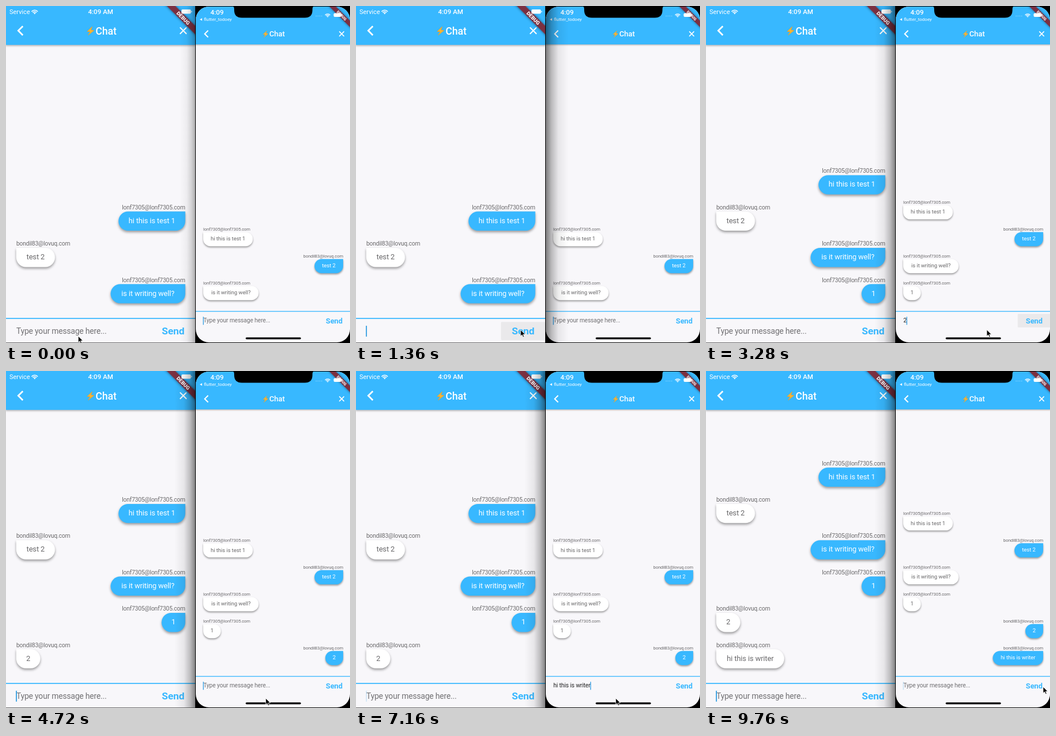
An HTML page that plays this animation: 600x588 px, repeating every 9.8 s.

```html
<!DOCTYPE html>
<html lang="en">
<head>
<meta charset="utf-8">
<title>Chat</title>
<style>
html, body { margin: 0; width: 100%; height: 100%; overflow: hidden; background: #000; }
svg { display: block; font-family: Roboto, "Open Sans", sans-serif; }
text { white-space: pre; }
.label { font-size: 11.8px; letter-spacing: -.23px; fill: #6c6b6d; }
.msg { font-size: 14.65px; letter-spacing: -.11px; text-anchor: middle; }
.field { font-size: 15.8px; letter-spacing: -.17px; }
.send { font-size: 19.8px; font-weight: 700; fill: #38b8ff; text-anchor: middle; }
.title { font-size: 20px; font-weight: 500; fill: #fff; }
.debug { font-size: 10.2px; font-weight: 900; fill: #fff; text-anchor: middle; }
.bubble { filter: drop-shadow(0 3px 2.5px rgba(0,0,0,.38)); }
.bar { filter: drop-shadow(0 2px 2px rgba(0,0,0,.28)); }
.status { fill: #fff; }
</style>
</head>
<body>
<svg id="stage" width="600" height="588" viewBox="0 0 600 588"></svg>
<script>
const LOOP = 9800;
const BLUE = '#38b8ff', PAPER = '#f8f7fa';
const ANN = 'lonf7305@lonf7305.com', BOB = 'bondil83@lovuq.com';

// sender, text, bubble width
const chat = [
  [ANN, 'hi this is test 1', 132.4],
  [BOB, 'test 2', 76.7],
  [ANN, 'is it writing well?', 148],
  [ANN, '1', 47],
  [BOB, '2', 47.7],
  [BOB, 'hi this is writer', 134.6]
];

const TYPE_AT = 4950, TYPE_STEP = 125, LAST = chat[5][1];

const phones = [
  { id: 'a', me: ANN, x: .3, y: 0, k: .88, w: 375, h: 668, top: 20, line: 619.5,
    arrive: [1460, 3600, 9300], press: [[1220, 1480]],
    typed: t => t >= 680 && t < 1340 ? '1' : '', cleared: [1340],
    caret: t => t < 400 ? 0 : t < 1600 ? 1 : blink(t - 1600) },
  { id: 'b', me: BOB, x: 331, y: 1, k: .6525, w: 414, h: 900, top: 44, line: 815,
    arrive: [1600, 3450, 8000], press: [[3050, 3420], [7780, 8160]],
    typed: t => {
      if (t >= 2600 && t < 3350) return '2';
      if (t < TYPE_AT || t >= 7900) return '';
      return LAST.slice(0, 1 + Math.floor((t - TYPE_AT) / TYPE_STEP));
    },
    cleared: [3350, 7900],
    caret: t => t < 2250 ? blink(t) : t < 3350 ? 1 : t < TYPE_AT ? blink(t - 3350)
      : t < 7850 ? 1 : blink(t - 7850) }
];

// time, x, y of the pointer tip
const path = [
  [0, 126, 576], [780, 126, 576], [1150, 287, 565], [1650, 287, 565],
  [2150, 453, 572], [2650, 453, 572], [2980, 575, 551], [3150, 575, 551],
  [3356, 453, 571], [7300, 453, 571], [7700, 588, 551], [LOOP, 588, 551]
];

const clamp = v => Math.max(0, Math.min(1, v));
const ease = v => v * v * (3 - 2 * v);

function blink(t) {
  const p = t % 1000 / 1000;
  if (p < .4) return 1;
  return p < .88 ? clamp((.6 - p) / .2) : (p - .88) / .12;
}

function bubble(x, y, w, mine) {
  const r = 19, b = y + 38, e = x + w;
  const a = (px, py) => `A${r} ${r} 0 0 1 ${px} ${py}`;
  const head = mine
    ? `M${x} ${y + r}${a(x + r, y)}H${e}`
    : `M${x} ${y}H${e - r}${a(e, y + r)}`;
  return `${head}V${b - r}${a(e - r, b)}H${x + r}${a(x, b - r)}Z`;
}

function row(p, [who, text, w], i) {
  const mine = who === p.me, x = mine ? p.w - 20 - w : 20, y = i * 72;
  return `<g id="${p.id}row${i}">
    <text class="label" x="${mine ? p.w - 20 : 20}" y="${y - 72.3}" text-anchor="${mine ? 'end' : 'start'}">${who}</text>
    <path class="bubble" d="${bubble(x, y - 68, w, mine)}" fill="${mine ? BLUE : '#fff'}"/>
    <text class="msg" x="${x + w / 2}" y="${y - 45}" fill="${mine ? '#fff' : '#69686a'}">${text}</text></g>`;
}

function phone(p) {
  const { id, w, top, line } = p, c = w / 2, m = top + 29;
  return `<g transform="translate(${p.x} ${p.y}) scale(${p.k})">
    <rect x="-1" width="${w + 1}" height="${p.h}" fill="${PAPER}"/>
    <g id="${id}list">${chat.map((msg, i) => row(p, msg, i)).join('')}</g>
    <rect class="bar" x="-1" width="${w + 1}" height="${top + 57.1}" fill="${BLUE}"/>
    <path d="M33 ${m - 9}l-9 9 9 9" fill="none" stroke="#fff" stroke-width="3.2"/>
    <path d="M${w - 30.5} ${m - 6.5}l13 13m0-13l-13 13" stroke="#fff" stroke-width="2.3"/>
    <path d="M${c - 17} ${m - 8}l-10 9.5 6 .5 -4 7 11.5-9.5 -6-1z" fill="#fdb62f" stroke="#e89a2c" stroke-width=".8"/>
    <text class="title" x="${c - 10.4}" y="${top + 36.4}">Chat</text>
    <g transform="translate(${w} 0) rotate(45)">
      <rect x="-60" y="28" width="120" height="12" fill="#7b3041" style="filter:drop-shadow(0 0 3px rgba(0,0,0,.5))"/>
      <text class="debug" x="0" y="37.6">DEBUG</text></g>
    <g transform="translate(0 ${line})">
      <rect x="-1" y="-1" width="${w + 1}" height="2" fill="${BLUE}"/>
      <rect id="${id}press" x="${w - 88}" y="7" width="88" height="36" rx="2" fill="#eae9eb"/>
      <text class="send" x="${w - 44}" y="31.8">Send</text>
      <text id="${id}hint" class="field" x="20.2" y="30" fill="#717073">Type your message here...</text>
      <text id="${id}text" class="field" x="20.2" y="30" fill="#222"></text>
      <rect id="${id}caret" y="14.5" width="2" height="21.5" fill="#2f9be0"/></g></g>`;
}

function wifi(x, y, s) {
  const arc = r => `<path d="M${-r * .75} ${-r * .66}A${r} ${r} 0 0 1 ${r * .75} ${-r * .66}" fill="none" stroke="#fff" stroke-width="1.7"/>`;
  return `<g transform="translate(${x} ${y}) scale(${s})">${arc(8)}${arc(5)}<path d="M0 0l-2-2.2a2.8 2.8 0 0 1 4 0z" fill="#fff"/></g>`;
}

function battery(x, y, w, h) {
  return `<rect x="${x}" y="${y}" width="${w}" height="${h}" rx="2"/><rect x="${x + w + .7}" y="${y + h / 2 - 1.3}" width="1.2" height="2.6" rx=".6"/>`;
}

function fade(id, from, to, dark) {
  const stop = (o, a) => `<stop offset="${o}" stop-opacity="${a}"/>`;
  return `<linearGradient id="${id}" x1="${from}" x2="${to}">${stop(0, dark)}${stop(.25, dark * .5)}${stop(.55, dark * .14)}${stop(1, 0)}</linearGradient>`;
}

const stage = document.getElementById('stage');
stage.innerHTML = `
  <defs>
    <clipPath id="left"><rect width="330" height="587.5"/></clipPath>
    <clipPath id="right"><rect x="331" y="1" width="269" height="586" rx="23"/></clipPath>
    ${fade('soft', 1, 0, .3)}${fade('back', 1, 0, .47)}${fade('front', 0, 1, .5)}
  </defs>
  <rect width="600" height="588"/>
  <g clip-path="url(#left)">${phone(phones[0])}
    <g class="status">
      <text x="6" y="14" font-size="11">Service</text>
      ${wifi(50, 14.5, .9)}
      <text x="165" y="14" font-size="11.6" font-weight="500" text-anchor="middle">4:09 AM</text>
      ${battery(306, 6, 16.5, 7.5)}
    </g>
    <rect id="soft-shade" x="303" width="27" height="588" fill="url(#soft)"/>
    <rect id="back-shade" x="294" width="36" height="588" fill="url(#back)"/>
  </g>
  <g clip-path="url(#right)">${phone(phones[1])}
    <g class="status">
      <text x="356.5" y="15.2" font-size="11.8" font-weight="500">4:09</text>
      <path d="M338 23.5l4-2.3v4.6z"/>
      <text x="345" y="26" font-size="8">flutter_todoey</text>
      <g opacity=".45">${[541, 544.2, 547.4, 550.6].map(x => `<circle cx="${x}" cy="17.5" r=".8"/>`).join('')}</g>
      ${wifi(561, 19.8, .75)}
      ${battery(571.5, 12.5, 13, 6.5)}
    </g>
    <rect x="418" y="578.2" width="96.5" height="3.3" rx="1.65"/>
    <rect id="front-shade" x="331" width="40" height="588" fill="url(#front)"/>
  </g>
  <path d="M393 0q5 0 5 5v2q0 13.5 13.5 13.5h109.5q13.5 0 13.5-13.5v-2q0-5 5-5z"/>
  <path id="mouse" d="M0 0v11.2l2.6-2.4 1.9 4 1.8-.8-1.8-3.9h3.6z" stroke="#fff" stroke-width=".8"/>`;

const el = id => document.getElementById(id);
const show = (id, on) => el(id).setAttribute('opacity', +on);

function drawPhone(p, t) {
  const { id } = p;
  const count = 3 + p.arrive.filter(a => t >= a).length;
  el(id + 'list').setAttribute('transform', `translate(0 ${p.line - (count - 1) * 72})`);
  chat.forEach((_, i) => show(id + 'row' + i, i < count));

  const text = p.typed(t), node = el(id + 'text');
  if (node.textContent !== text) node.textContent = text;
  const last = p.cleared.filter(c => t >= c).pop() ?? -1000;
  show(id + 'hint', text ? 0 : clamp((t - last - 40) / 180));

  const shift = text ? node.getComputedTextLength() + .5 : 0;
  el(id + 'caret').setAttribute('x', 19.3 + shift);
  show(id + 'caret', p.caret(t));
  show(id + 'press', Math.max(...p.press.map(([a, b]) => Math.min(clamp((t - a) / 100), clamp((b + 180 - t) / 180)))));
}

function draw(t) {
  phones.forEach(p => drawPhone(p, t));
  show('soft-shade', t < 400);
  show('front-shade', t >= 400 && t < 2250);
  show('back-shade', t >= 2250);

  const i = Math.max(1, path.findIndex(k => k[0] > t));
  const [t0, x0, y0] = path[i - 1], [t1, x1, y1] = path[i];
  const e = ease((t - t0) / (t1 - t0));
  el('mouse').setAttribute('transform', `translate(${x0 + (x1 - x0) * e} ${y0 + (y1 - y0) * e})`);
}

const start = performance.now();
function tick() {
  draw((performance.now() - start) % LOOP);
  requestAnimationFrame(tick);
}
tick();
</script>
</body>
</html>
```
